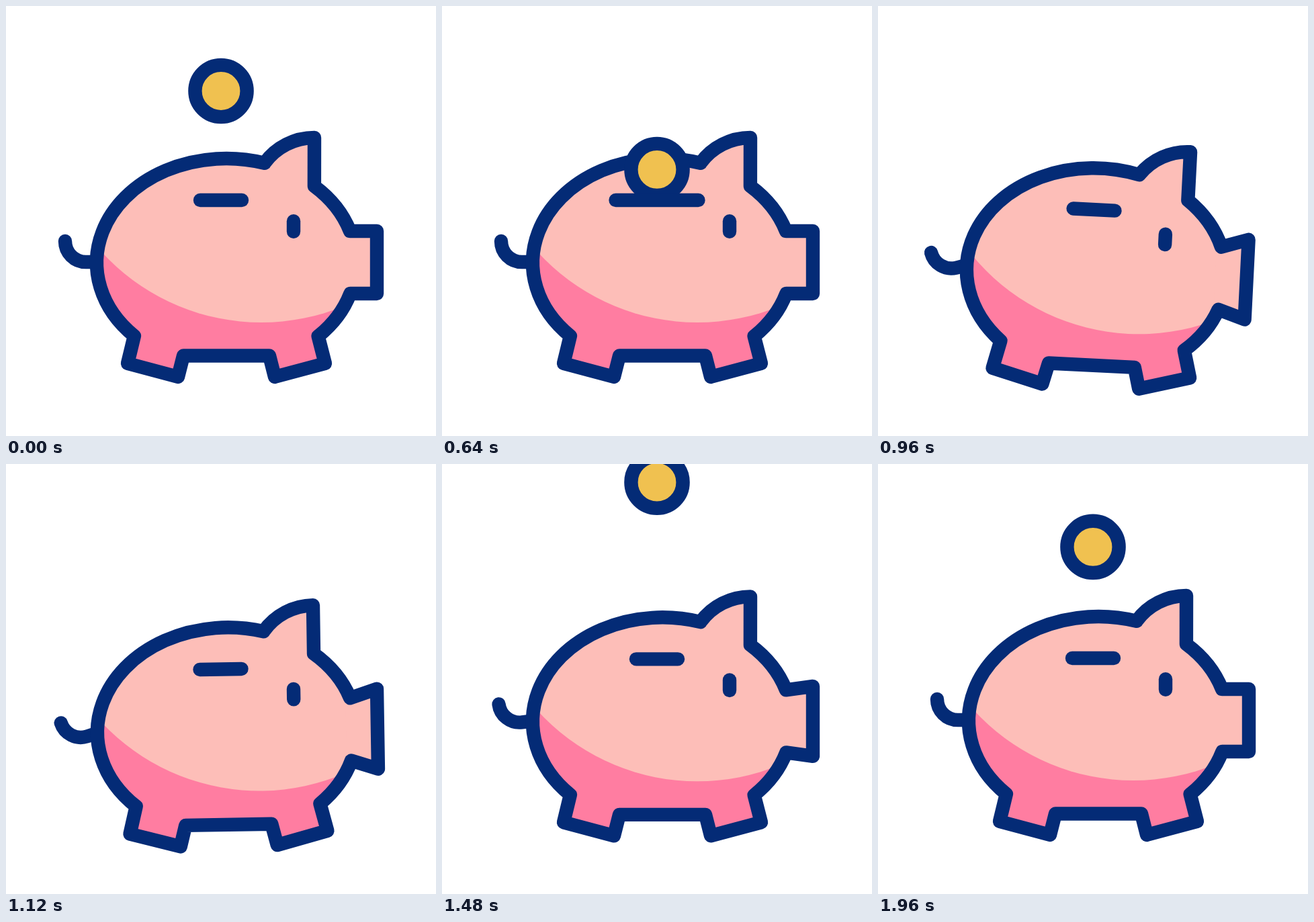
These frames come from a looping animation (640x640 px, 2 s). An HTML page with a canvas:

```html
<!DOCTYPE html>
<html lang="en">
<head>
<meta charset="utf-8">
<title>Piggy bank</title>
<style>
  html, body { margin: 0; width: 100%; height: 100%; overflow: hidden; background: #fff; }
  canvas { display: block; width: 640px; height: 640px; }
</style>
</head>
<body>
<canvas id="stage" width="640" height="640"></canvas>
<script>
const ctx = document.getElementById('stage').getContext('2d');
const NAVY = '#042b76', PINK = '#fdbeb8', ROSE = '#ff7da1', GOLD = '#f0c150';
const LOOP = 2000, SLOT_Y = 289, RAD = Math.PI / 180;

// Piecewise eased value; keys are [time, value] pairs.
function track(t, ...keys) {
  if (t <= keys[0][0]) return keys[0][1];
  for (let i = 1; i < keys.length; i++) {
    const [t0, a] = keys[i - 1], [t1, b] = keys[i];
    if (t < t1) {
      const u = (t - t0) / (t1 - t0);
      return a + (b - a) * u * u * (3 - 2 * u);
    }
  }
  return keys[keys.length - 1][1];
}

// The coin falls with constant acceleration, and a new one brakes from above.
function coinY(t) {
  return t < 1200
    ? 126.5 + 3.513e-4 * Math.max(0, t - 64) ** 2
    : 123.8 - 3.686e-4 * Math.max(0, 1993 - t) ** 2;
}

function line(x1, y1, x2, y2) {
  ctx.beginPath();
  ctx.moveTo(x1, y1);
  ctx.lineTo(x2, y2);
  ctx.stroke();
}

function bodyPath(flare) {
  const p = new Path2D();
  const angle = (x, y) => Math.atan2((y - 382) / 155, (x - 328) / 193);
  const arc = (x1, y1, x2, y2, ccw) =>
    p.ellipse(328, 382, 193, 155, 0, angle(x1, y1), angle(x2, y2), ccw);
  arc(385, 233.5, 191, 491, true);
  for (const [x, y] of [[181, 532], [256, 552], [264, 520.5], [392, 520.5],
                        [400, 552], [475, 532]]) p.lineTo(x, y);
  arc(464, 491, 512, 428, true);
  p.lineTo(552, 428 + flare);
  p.lineTo(552, 335 - flare);
  arc(512, 335, 459, 268, true);
  p.lineTo(459, 196);
  p.arc(459, 287.8, 91.8, -90 * RAD, Math.atan2(-54.3, -74), true);
  p.closePath();
  return p;
}

function drawTail(turn) {
  ctx.save();
  ctx.translate(135, 381);
  ctx.rotate(-turn * RAD);
  ctx.beginPath();
  ctx.moveTo(0, 0);
  ctx.lineTo(-16, 0);
  ctx.arc(-16, -31, 31, 90 * RAD, 180 * RAD);
  ctx.stroke();
  ctx.restore();
}

function drawBody(body) {
  ctx.save();
  ctx.clip(body);
  ctx.fillStyle = ROSE;
  ctx.fillRect(0, 0, 640, 640);
  ctx.fillStyle = PINK;
  ctx.beginPath();
  ctx.arc(380, 149.3, 321.7, 0, 360 * RAD);
  ctx.fill();
  ctx.fillRect(505, 300, 100, 148);
  ctx.restore();
  ctx.stroke(body);
}

function drawCoin(y) {
  ctx.fillStyle = GOLD;
  ctx.beginPath();
  ctx.arc(320, y, 38.6, 0, 360 * RAD);
  ctx.fill();
  ctx.stroke();
}

function draw(t) {
  const drop = track(t, [667, 0], [1067, 17], [1567, 0]);
  const tilt = track(t, [667, 0], [1000, 3], [1200, -3], [1400, 0]);
  const puff = track(t, [667, 0], [933, 1], [1333, 1], [1600, 0]);
  const slot = 31 + track(t, [333, 0], [733, 35.2], [933, 0]);

  const pose = () => {
    ctx.translate(320, 320 + drop);
    ctx.rotate(tilt * RAD);
    ctx.translate(-320, -320);
  };

  ctx.resetTransform();
  ctx.clearRect(0, 0, 640, 640);
  ctx.strokeStyle = NAVY;
  ctx.lineWidth = 20.4;
  ctx.lineCap = ctx.lineJoin = 'round';

  pose();
  drawTail(17 * puff);
  drawBody(bodyPath(13 * puff));
  line(428, 320.2, 428, 335.7);

  // The coin shows only above the slot.
  ctx.save();
  ctx.beginPath();
  ctx.rect(-400, -400, 1400, SLOT_Y + 400);
  ctx.clip();
  ctx.resetTransform();
  drawCoin(coinY(t));
  ctx.restore();

  line(320 - slot, SLOT_Y, 320 + slot, SLOT_Y);
}

const start = performance.now();
function tick() {
  draw((performance.now() - start) % LOOP);
  requestAnimationFrame(tick);
}
tick();
</script>
</body>
</html>
```
